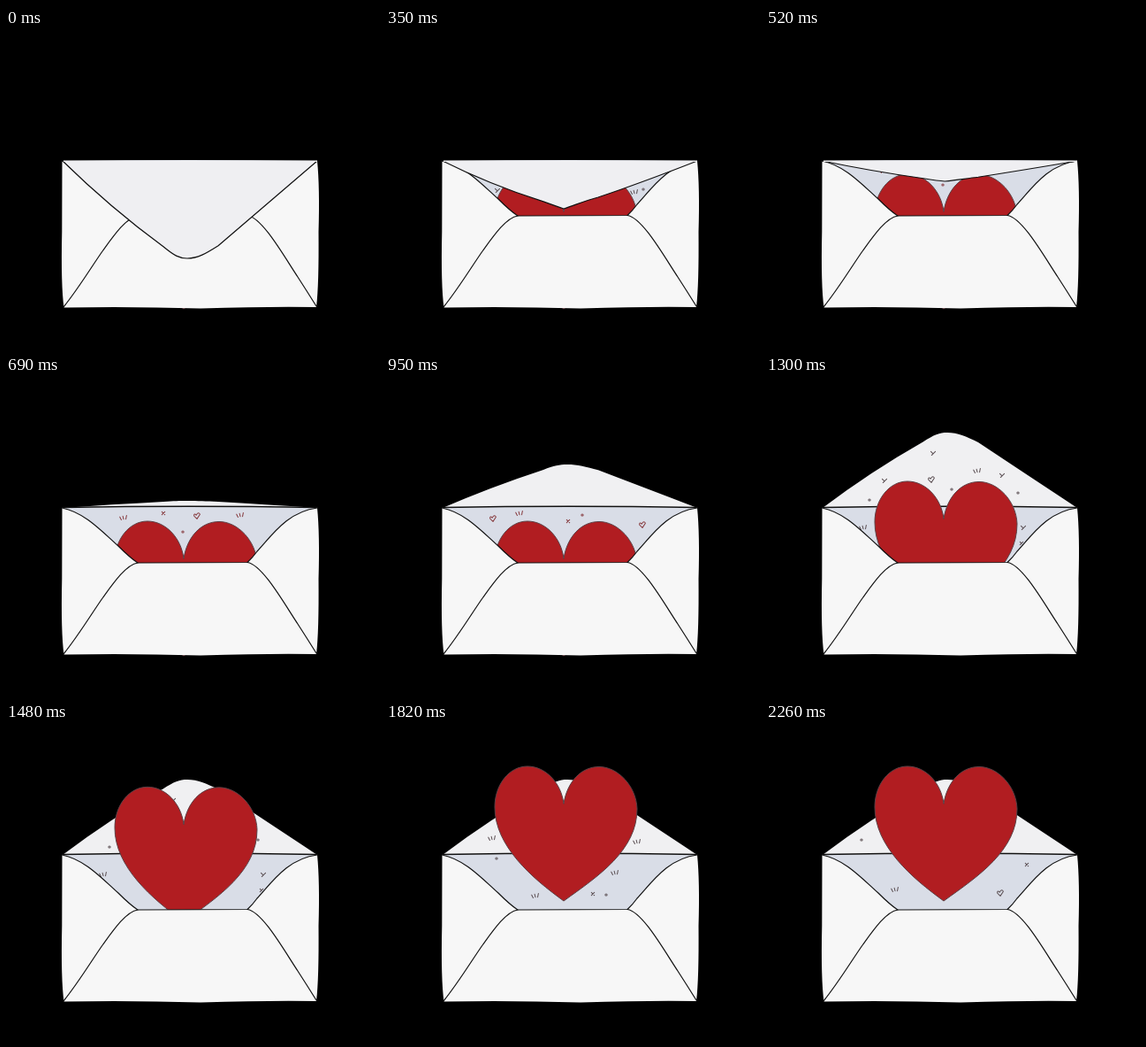
An HTML page with a canvas for the animation above (2.35 s loop, 423 px wide and 360 px high).

```html
<!DOCTYPE html>
<html lang="en">
<head>
<meta charset="utf-8">
<title>Love letter</title>
<style>
html, body { margin: 0; width: 100%; height: 100%; overflow: hidden; background: #000; }
canvas { display: block; }
</style>
</head>
<body>
<canvas id="stage" width="423" height="360"></canvas>
<script>
const ctx = document.getElementById('stage').getContext('2d');
const LOOP = 2350, STEPS = 27, HINGE = 150;

const inside = new Path2D('M64 150Q205 148 352 150L290 214H140Z');
const hinge = new Path2D('M64 149.500Q205 147 352 149.500');
const rimLine = 'M63.500 150C88 155 106 174 127 193Q140 206 149 212L273 211.500Q279 206 284 199C303 178 320 154 352 150';
const rim = new Path2D(rimLine);
const pocket = new Path2D(rimLine + 'Q355 180 353.500 230Q354 290 351 315Q300 314 220 316.500Q140 314 65.500 315.500Q62 290 63.300 230Z');
const seams = new Path2D('M65 315C82 294 97 269 109 252C122 234 136 214 149 212M273 211.500C290 214 314 257 330 281Q341 298 351 314');
const heart = new Path2D('M201 92C198 68 180 50 160 50C139 50 123 71 123 96C123 140 165 176 201 202C240 174 284 145 284 98C283 72 262 50.500 241 50.500C221 50.500 205 67 201 92Z');

const flapKeys = [[0, 260], [4, 204], [8, 142], [11, 101], [13, 65]];
const heartKeys = [[13, 115], [15, 70], [18, 0]];

const glyphs = {
  l: new Path2D('M-5 -1L-3 3M-1 -2L0 2M4 -3L3 2'),
  x: new Path2D('M-2 -2L2 2M2 -2L-2 2'),
  h: new Path2D('M0 4L-4 0Q-4 -4 -1 -1Q2 -6 4 -2Z'),
  o: new Path2D('M1.300 0A1.300 1.300 0 1 1 -1.300 0A1.300 1.300 0 1 1 1.300 0'),
  v: new Path2D('M-3 -2L0 1L3 -2M0 1L-2 3')
};

// Doodles: first step, then glyph and position of each mark
const doodles = [
  [0, 'v 126 183, l 281 185, o 291 182'],
  [6, 'l 133 161, x 178 156, h 216 159, l 265 158, o 200 177'],
  [10, 'h 121 162, l 151 156, x 206 165, o 222 158, h 290 169'],
  [13, 'v 189 88, v 134 119, h 187 118, l 239 108, v 267 113, o 285 133, o 117 141, o 210 129, l 110 172, v 291 172, x 289 190'],
  [18, 'l 120 131, l 284 135, o 125 154, l 169 196, l 259 170, x 234 194, o 249 195'],
  [24, 'o 108 133, x 295 161, l 146 189, h 265 193']
];

function track(keys, t) {
  let [t0, v0] = keys[0];
  for (const [t1, v1] of keys) {
    if (t < t1) return t <= t0 ? v0 : v0 + (v1 - v0) * (t - t0) / (t1 - t0);
    [t0, v0] = [t1, v1];
  }
  return v0;
}

function flapPath(tip, sharp) {
  const y = (part, drop = 0) => HINGE + (tip - HINGE) * (part - sharp * drop);
  const p = new Path2D();
  p.moveTo(64, HINGE);
  p.quadraticCurveTo(118, y(.48, -.02), 178, y(.88, .03));
  p.bezierCurveTo(190, y(.97, .04), 196, y(1, .03), 205 - 4 * sharp, tip);
  p.bezierCurveTo(217, y(1, .1), 226, y(.95, .12), 240, y(.87, .11));
  p.quadraticCurveTo(290, y(.48, .03), 352, HINGE);
  return p;
}

function paint(path, fill, line, width = 1.2) {
  if (fill) {
    ctx.fillStyle = fill;
    ctx.fill(path);
  }
  if (line) {
    ctx.strokeStyle = line;
    ctx.lineWidth = width;
    ctx.stroke(path);
  }
}

function drawDoodles(step) {
  const marks = doodles.filter(d => d[0] <= step).pop()[1];
  for (const mark of marks.split(', ')) {
    const [kind, x, y] = mark.split(' ');
    ctx.save();
    ctx.translate(+x, +y);
    ctx.scale(.85, .85);
    paint(glyphs[kind], null, step > 5 && step < 13 ? '#873c40' : '#5c5054');
    ctx.restore();
  }
}

function draw(step) {
  const tip = track(flapKeys, step);
  const open = tip < HINGE;
  const flap = flapPath(tip, open ? 0 : Math.sin(Math.PI * step / 8));
  ctx.fillStyle = '#000';
  ctx.fillRect(0, 0, 423, 360);
  if (open) paint(flap, '#f0f0f2');
  paint(inside, '#d9dde7');
  if (open) paint(hinge, null, '#111', 1.4);
  drawDoodles(step);

  ctx.save();
  ctx.translate(0, track(heartKeys, step));
  paint(heart, '#b11d21', '#5c4045', 1);
  ctx.restore();

  paint(pocket, '#f7f7f7');
  paint(rim, null, '#111');
  paint(seams, null, '#111');
  if (!open) {
    paint(flap, '#efeff2', '#111');
    ctx.fillRect(65, 149.5, 287, 1.5);
  }
}

function tick() {
  const t = performance.now() % LOOP;
  draw(Math.min(STEPS - 1, Math.floor((t + 8.4) * STEPS / LOOP)));
  requestAnimationFrame(tick);
}

ctx.lineCap = ctx.lineJoin = 'round';
tick();
</script>
</body>
</html>
```
